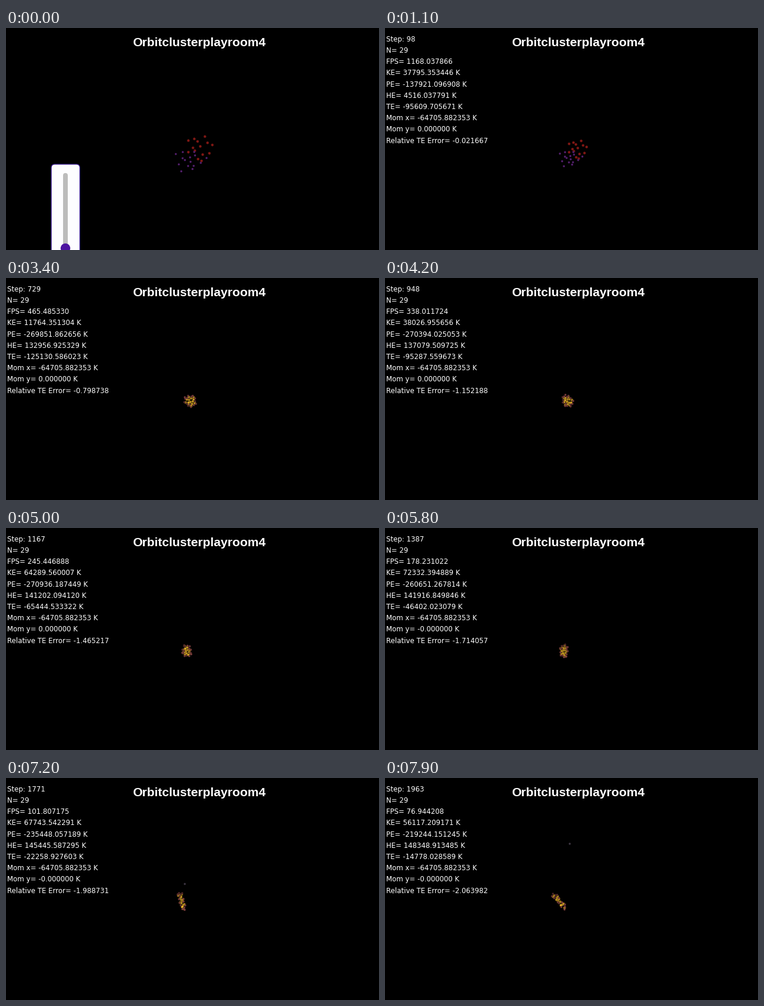
A matplotlib script that plays this animation: 634 by 378 pixels, repeating every 8 s.

```python
import numpy as np
import matplotlib.pyplot as plt
from matplotlib.animation import FuncAnimation
from matplotlib.patches import Circle, FancyBboxPatch

W, H, DPI = 634, 378, 100
FRAMES, INTERVAL = 80, 100
PT = 72 / DPI  # points per pixel
START, CONTACT, HOT = 0.745, 1.1, 3.4  # seconds
N_HEAVY, N_LIGHT = 14, 15
N = N_HEAVY + N_LIGHT
ESCAPEE = N - 1
GOLDEN = np.pi * (3 - np.sqrt(5))

# Energies at a few moments; the values between are interpolated.
MOMENTS = [1.1, 2.1, 3.4, 5.0, 6.5, 7.9]
KINETIC = [37795.353446, 13174.860694, 11764.351304,
           64289.560007, 79369.875410, 56117.209171]
POTENTIAL = [-137921.096908, -232284.712588, -269851.862656,
             -270936.187449, -251651.963133, -219244.151245]
HEAT = [4516.037791, 102886.520500, 132956.925329,
        141202.094120, 142542.261106, 148348.913485]


def smooth(x):
    x = np.clip(x, 0, 1)
    return x * x * (3 - 2 * x)


def by_kind(heavy, light):
    return np.repeat([heavy, light], [N_HEAVY, N_LIGHT], axis=0)


# Sunflower layout, one for each kind of particle, loosened by some noise.
rng = np.random.default_rng(8)
rank = np.r_[(np.arange(N_HEAVY) + 0.5) / N_HEAVY,
             (np.arange(N_LIGHT) + 0.5) / N_LIGHT]
spread = np.sqrt(rank)
phase = np.r_[np.arange(N_HEAVY), np.arange(N_LIGHT)] * GOLDEN
unit = spread[:, None] * np.c_[np.cos(phase), np.sin(phase)]
rest = (by_kind((329, 204), (312, 225)) + unit * by_kind((23, 25), (27, 18))
        + rng.normal(0, 1.8, (N, 2)))
centre = np.array([321, 212])

# Outlying particles join the cluster last; light ones end at its rim.
reach = np.hypot(*(rest - centre).T)
join_start = CONTACT + 0.7 * (reach / reach.max()) ** 6
radius = np.where(np.arange(N) < N_HEAVY, 0.88 * spread, 0.5 + 0.54 * spread)
wobble = rng.uniform(0, 2 * np.pi, N)
shade = rng.uniform(0.75, 1.1, N)[:, None]

COLD = by_kind((134, 25, 21), (94, 35, 122))
WARM = by_kind((198, 108, 30), (126, 60, 68)) * shade
GLOWING = by_kind((214, 164, 38), (126, 62, 62)) * shade


def packed_places(t):
    """Drifting cluster that turns and is drawn out into two lobes."""
    pull = smooth((t - 4) / 3.9) ** 3
    length = 11.2 + 6.6 * pull
    width = 10.6 - 3.4 * smooth((t - 2) / 4.5)
    tilt = np.radians(np.interp(t, [2.1, 5, 6.5, 7.9], [-20, 78, 105, 50]))

    turn = phase + 0.35 * t + 0.15 * np.sin(5 * t + wobble)
    u, v = radius * np.cos(turn), radius * np.sin(turn)
    along = length * u
    across = width * v * (1 - 0.6 * pull * (1 - np.abs(u)))
    x = 318.5 - 3.9 * (t - 2.1) + along * np.cos(tilt) - across * np.sin(tilt)
    y = 209.5 + along * np.sin(tilt) + across * np.cos(tilt)
    return np.c_[x, y], u


def particles(t):
    """Positions, colours and heat of all particles at t seconds."""
    fall = np.clip((t - START) / (CONTACT - START), 0, 1) ** 1.5
    loose = centre + (rest - centre) * (1 - 0.27 * fall)
    packed, u = packed_places(t)
    join = smooth((t - join_start) / 0.95)[:, None]
    pos = loose + (packed - loose) * join

    hot = WARM + (GLOWING - WARM) * smooth((t - 2.1) / (HOT - 2.1))
    hot = hot * (1 + 0.15 * u * smooth((t - 4.5) / 1.5))[:, None]
    colors = COLD + (hot - COLD) * join

    if t > 7.05:
        flight = (t - 7) / 0.9
        pos[ESCAPEE] = 301 + 13 * flight, 200 - 88 * flight
        colors[ESCAPEE] = 66, 58, 72
    return pos, np.clip(colors / 255, 0, 1)


def readout(t):
    ke, pe, he = (np.interp(t, MOMENTS, series)
                  for series in (KINETIC, POTENTIAL, HEAT))
    age = t - START
    step = round(98 + 274.2 * (t - CONTACT))
    fps = 1168.037866 * np.exp(-0.4 * (t - CONTACT))
    error = -2.17 * (1 - np.exp(-(age / 4) ** 1.9))
    sign = "-" if t > 5.7 else ""
    return [f"Step: {step}",
            f"N= {N}",
            f"FPS= {fps:.6f}",
            f"KE= {ke:.6f} K",
            f"PE= {pe:.6f} K",
            f"HE= {he:.6f} K",
            f"TE= {ke + pe + he:.6f} K",
            "Mom x= -64705.882353 K",
            f"Mom y= {sign}0.000000 K",
            f"Relative TE Error= {error:.6f}"]


fig = plt.figure(figsize=(W / DPI, H / DPI), dpi=DPI, facecolor="black")
ax = fig.add_axes([0, 0, 1, 1])
ax.set(xlim=(0, W), ylim=(H, 0))
ax.axis("off")

ax.text(328, 31, "Orbitclusterplayroom4", color="white", ha="center",
        va="baseline", family="Liberation Sans", weight="bold",
        size=21.2 * PT)
lines = [ax.text(2, 22.8 + 19.2 * i, "", color="white", va="baseline",
                 family="DejaVu Sans", size=11.7 * PT) for i in range(10)]


def rounded(x, y, w, h, r, **style):
    return ax.add_patch(FancyBboxPatch(
        (x, y), w, h, boxstyle=f"round,pad=0,rounding_size={r}", **style))


panel = [
    rounded(77, 232, 48.5, 170, 6, fc="#fdfdff", ec="#3c1a96", lw=0.9),
    rounded(97, 247, 8, 145, 4, fc="#bcbcbc", ec="none"),
    ax.add_patch(Circle((101, 375), 8.2, fc="#4c14a0", ec="none"))]

sizes = (by_kind(4.1, 3.1) * PT) ** 2
dots = ax.scatter(*rest.T, s=sizes, linewidths=0.45)


def draw(frame):
    t = frame * INTERVAL / 1000
    pos, colors = particles(t)
    dots.set_offsets(pos)
    dots.set_facecolors(colors)
    dots.set_edgecolors(colors * 0.6)

    for part in panel:
        part.set_alpha(np.clip(1 - (frame - 1) / 4, 0, 1))
    texts = readout(t) if frame >= 8 else [""] * len(lines)
    for line, text in zip(lines, texts):
        line.set_text(text)
    return [dots, *panel, *lines]


anim = FuncAnimation(fig, draw, frames=FRAMES, interval=INTERVAL,
                     repeat=True, repeat_delay=0, blit=False)
plt.show()
```
